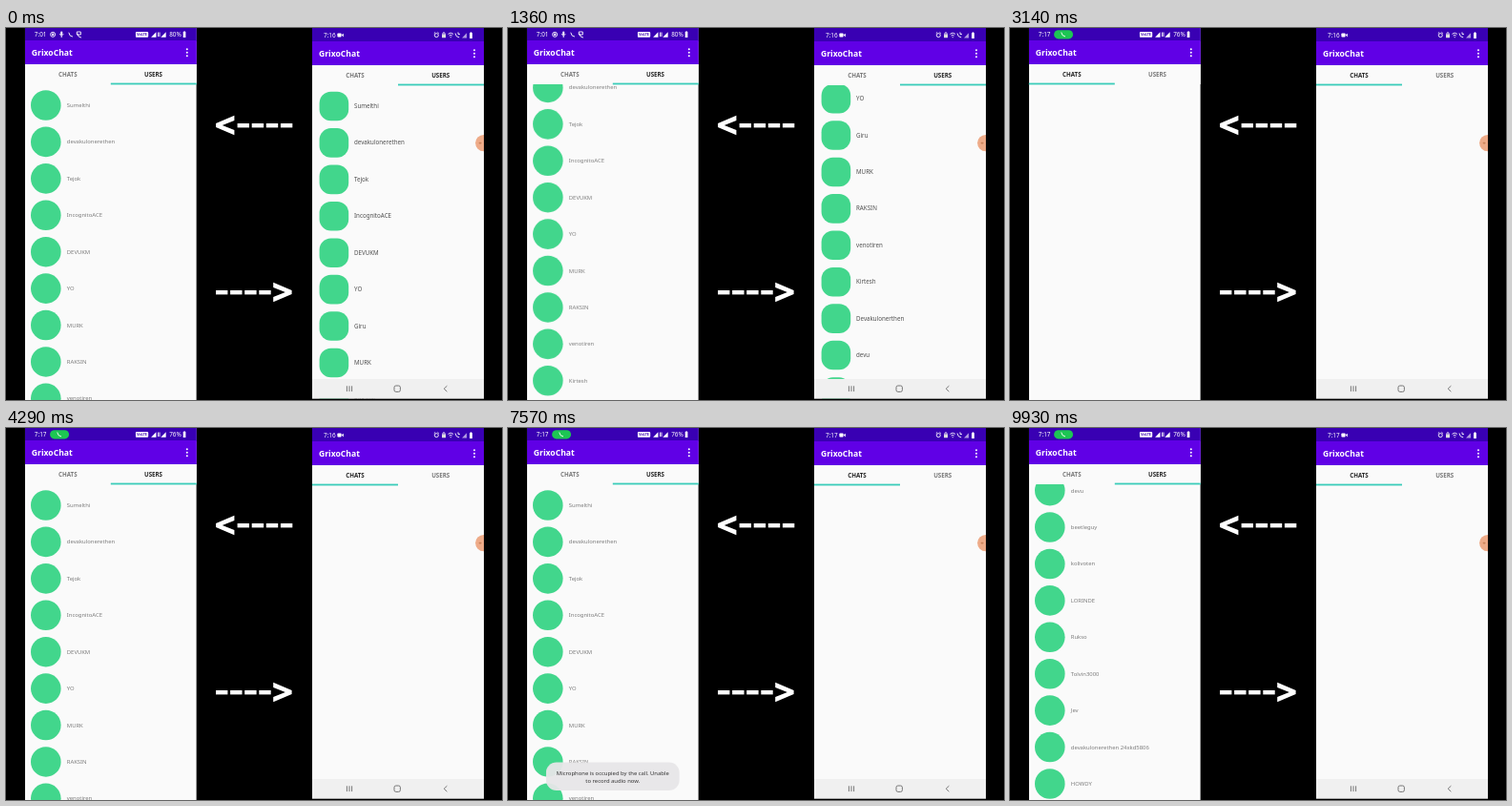
Animation, 520 px wide and 390 px high, one loop 10 s. Source, as an HTML page:

```html
<!DOCTYPE html>
<html lang="en">
<head>
<meta charset="utf-8">
<title>Two phones chatting</title>
<style>
html, body { margin: 0; width: 100%; height: 100%; overflow: hidden; background: #000; }
svg { display: block; width: 520px; height: 390px; }
text { font-family: "Noto Sans", sans-serif; }
.title { font-size: 8.6px; font-weight: 600; fill: #fff; }
.tab { font-size: 6.2px; font-weight: 600; text-anchor: middle; }
.status { font-size: 6.4px; fill: #fff; }
.badge { font-size: 3.6px; font-weight: 700; fill: #3700b3; text-anchor: middle; }
.toast text { font-size: 5.9px; fill: #333; text-anchor: middle; }
.left .name { font-size: 5.9px; fill: #7c7c7c; }
.right .name { font-size: 6.2px; fill: #505050; }
.icon { fill: none; stroke: #fff; stroke-width: .9; }
.key { fill: none; stroke: #777; stroke-width: 1; }

/* One loop is 10 s, so 1% is 100 ms. */
[class*="a-"] { animation: 10s linear infinite; }
.a-early { animation-name: early; animation-timing-function: step-end; }
.a-late { animation-name: late; animation-timing-function: step-end; }
.a-min16 { animation-name: min16; animation-timing-function: step-end; }
.a-min17 { animation-name: min17; animation-timing-function: step-end; }
.a-left-chats { animation-name: leftChats; animation-timing-function: step-end; }
.a-left-users { animation-name: leftUsers; animation-timing-function: step-end; }
.a-right-chats { animation-name: rightChats; animation-timing-function: step-end; }
.a-right-users { animation-name: rightUsers; animation-timing-function: step-end; }
.a-left-page { animation-name: leftPage; }
.a-left-line { animation-name: leftLine; }
.a-right-page { animation-name: rightPage; }
.a-right-line { animation-name: rightLine; }
.a-first-scroll { animation-name: firstScroll; }
.a-last-scroll { animation-name: lastScroll; }
.a-right-scroll { animation-name: rightScroll; }
.a-touch { animation-name: touch; }
.a-glow { animation-name: glow; }
.a-toast { animation-name: toast; }
.a-bubble { animation-name: bubble; }

@keyframes early { 0% { opacity: 1 } 30%, 100% { opacity: 0 } }
@keyframes late { 0% { opacity: 0 } 30%, 100% { opacity: 1 } }
@keyframes min16 { 0% { opacity: 1 } 74.3%, 100% { opacity: 0 } }
@keyframes min17 { 0% { opacity: 0 } 74.3%, 100% { opacity: 1 } }
@keyframes leftChats { 0% { fill: #777 } 30% { fill: #222 } 38.2%, 100% { fill: #777 } }
@keyframes leftUsers { 0% { fill: #222 } 30% { fill: #777 } 38.2%, 100% { fill: #222 } }
@keyframes rightChats { 0% { fill: #777 } 24.2%, 100% { fill: #222 } }
@keyframes rightUsers { 0% { fill: #222 } 24.2%, 100% { fill: #777 } }

@keyframes leftPage {
  0%, 36.8% { transform: translateX(180px); animation-timing-function: ease-out }
  40%, 100% { transform: none }
}
@keyframes leftLine {
  0%, 29.99% { transform: none }
  30%, 36.8% { transform: translateX(-90px); animation-timing-function: ease-out }
  40%, 100% { transform: none }
}
@keyframes rightPage {
  0%, 22.6% { transform: none; animation-timing-function: ease-out }
  26.6%, 100% { transform: translateX(181px) }
}
@keyframes rightLine {
  0%, 22.6% { transform: none; animation-timing-function: ease-out }
  26.6%, 100% { transform: translateX(-90px) }
}
@keyframes firstScroll {
  0%, .7% { transform: none }
  2.5% { transform: translateY(-120px); animation-timing-function: cubic-bezier(.2, .6, .4, 1) }
  7.4%, 9.5% { transform: translateY(-400px) }
  11.4% { transform: translateY(-300px); animation-timing-function: cubic-bezier(.2, .6, .4, 1) }
  16.5%, 100% { transform: none }
}
@keyframes lastScroll {
  0%, 87.6% { transform: none }
  90% { transform: translateY(-44.5px) }
  92% { transform: translateY(-150px); animation-timing-function: cubic-bezier(.2, .6, .4, 1) }
  98%, 100% { transform: translateY(-438px) }
}
@keyframes rightScroll {
  0%, 8.5% { transform: none }
  9.3% { transform: translateY(-4px) }
  10.6% { transform: translateY(-70px); animation-timing-function: ease-out }
  13.4%, 14.2% { transform: translateY(-200px); animation-timing-function: ease-in-out }
  16.8%, 100% { transform: none }
}
@keyframes touch {
  0%, .69% { opacity: 0; transform: translate(145px, 320px) }
  .7% { opacity: 1; transform: translate(145px, 320px) }
  2.5% { opacity: 1; transform: translate(145px, 200px) }
  2.6%, 8.6% { opacity: 0; transform: translate(145px, 200.5px) }
  8.7%, 9.5% { opacity: 1; transform: translate(145px, 200.5px) }
  11.4% { opacity: 1; transform: translate(145px, 300px) }
  11.5%, 87.3% { opacity: 0; transform: translate(149px, 344.5px) }
  87.4%, 87.6% { opacity: 1; transform: translate(149px, 344.5px) }
  90% { opacity: 1; transform: translate(149px, 300px) }
  92% { opacity: 1; transform: translate(149px, 194.5px) }
  92.1%, 100% { opacity: 0; transform: translate(149px, 194.5px) }
}
@keyframes glow {
  0%, 16.2% { transform: scaleY(0); opacity: 0 }
  18%, 18.8% { transform: scaleY(1); opacity: .15 }
  22%, 100% { transform: scaleY(0); opacity: 0 }
}
@keyframes toast {
  0%, 44.5% { opacity: 0 }
  46.4%, 79.4% { opacity: 1 }
  82%, 100% { opacity: 0 }
}
@keyframes bubble {
  0%, 47.2% { transform: none }
  48.6%, 57.2% { transform: translateX(-3px) }
  58.4%, 83.8% { transform: none }
  85.4%, 94% { transform: translateX(-3px) }
  96%, 100% { transform: none }
}
</style>
</head>
<body>
<svg id="stage" viewBox="0 0 520 390"></svg>
<script>
const PITCH = 38.42;
const APP = "GrixoChat";
const head = ["Sumelthi", "devakulonerethen", "Tejok", "IncognitoACE", "DEVUKM", "YO"];
const middle = ["MURK", "RAKSIN", "venotiren", "Kirtesh", "Devakulonerthen", "devu", "beetleguy",
  "kolivoten", "LORINDE", "Rukso", "Tolvin3000", "Jev"];
const firstList = [...head, ...middle, "HOWDY"];
const lastList = [...head, ...middle, "devakulonerethen 24xkd5806", "HOWDY"];
const rightList = [...head, "Giru", ...middle];

const group = (cls, body, at = "0 0") => `<g transform="translate(${at})"><g class="${cls}">${body}</g></g>`;
const rect = (x, y, w, h, fill, rx = 0) =>
  `<rect x="${x}" y="${y}" width="${w}" height="${h}" rx="${rx}" fill="${fill}"/>`;
const text = (cls, x, y, s) => `<text class="${cls}" x="${x}" y="${y}">${s}</text>`;
const icon = (d, cls = "icon") => `<path class="${cls}" d="${d}"/>`;
const solid = d => `<path fill="#fff" d="${d}"/>`;

const roundAvatar = y => `<circle cx="22" cy="${y}" r="15.8" fill="#42d68c"/>`;
const squareAvatar = y => rect(7.6, y - 15.3, 30.6, 30.6, "#42d68c", 12);
const rows = (names, avatar) => names.map((name, i) => {
  const y = +(81 + i * PITCH).toFixed(2);
  return avatar(y) + text("name", 44, y + 2, name);
}).join("");

const header = side =>
  rect(0, -1, 180, 15, "#3900b3") + rect(0, 13, 180, 25.2, "#6000e6") + rect(0, 38, 180, 21, "#fafafa") +
  text("title", 7, 29.2, APP) +
  [22.3, 25.8, 29.3].map(y => `<circle cx="170" cy="${y}" r="1" fill="#fff"/>`).join("") +
  text(`tab a-${side}-chats`, 45, 50.7, "CHATS") + text(`tab a-${side}-users`, 134.7, 50.7, "USERS") +
  group(`a-${side}-line`, rect(90, 57.6, 90, 1.8, "#3accb9"));

const handset = (x, y) => icon(`M${x - 2} ${y - 2.3}q.3 4 4.2 4.4`);
const battery = x => rect(x - 1.4, 4, 2.8, 6, "#fff", .5) + rect(x - .7, 3.3, 1.4, 1, "#fff");
const signal = x => solid(`M${x - 2.7} 9.8h5.4v-5.6z`);

const leftStatus =
  group("a-early", text("status", 10, 9.2, "7:01") + text("status", 151.4, 9.2, "80%") +
    `<circle class="icon" cx="29.3" cy="6.8" r="2.5"/><circle cx="29.3" cy="6.8" r="1.3" fill="#fff"/>` +
    rect(37.4, 3.6, 2, 3.8, "#fff", 1) + icon("M36.4 6.2q2 3.6 4 0M38.4 8v2") + handset(48, 7) +
    icon("M54.5 4h4v3h-4z") + handset(57, 8)) +
  group("a-late", text("status", 10, 9.2, "7:17") + text("status", 151.4, 9.2, "76%") +
    rect(26.3, 2.2, 20, 9.2, "#1dc653", 4.6) + handset(36, 6.8)) +
  rect(116, 4, 13.4, 5.8, "#fff", 1) + text("badge", 122.7, 8.3, "VoLTE") +
  signal(135) + signal(145.2) + icon("M139.8 4.5v4.6M141.2 4.5v4.6") + battery(167.3);

const rightStatus =
  group("a-min16", text("status", 12, 9, "7:16")) + group("a-min17", text("status", 12, 9, "7:17")) +
  rect(26.4, 4.5, 4.2, 4, "#fff", .8) + solid("M30.8 6.3l2-1.5v3.6z") +
  `<circle class="icon" cx="130.3" cy="6.6" r="2"/>` + icon("M127.8 4.6l1.3-1.2M132.8 4.6l-1.3-1.2") +
  rect(136, 5.5, 4, 3.8, "#ddd", .5) + icon("M136.9 5.8v-1.4q1.1-1.6 2.2 0v1.4") +
  icon("M142.5 5.3q2.7-2.3 5.4 0M143.7 7q1.5-1.3 3 0") + solid("M144.4 8.3h1.6l-.8 1.2z") +
  handset(152, 6.8) + icon("M153 3.4v2h2") +
  `<path fill="#fff" opacity=".6" d="M157 9.4h5v-5.2z"/>` + battery(166.5);

const screen = rect(0, -1, 180, 392, "#fafafa");

const leftPhone = screen +
  group("a-early", group("a-first-scroll", rows(firstList, roundAvatar))) +
  group("a-late", group("a-left-page", group("a-last-scroll", rows(lastList, roundAvatar)))) +
  header("left") + leftStatus +
  group("toast a-toast", rect(20, 350.6, 140, 29.4, "rgba(231,230,232,.95)", 11) +
    text("", 90, 364.2, "Microphone is occupied by the call. Unable") +
    text("", 90, 372, "to record audio now.")) +
  group("a-touch", `<circle r="5" fill="#fff" fill-opacity=".5" stroke="#bbb" stroke-width=".8"/>`);

const rightPhone = screen +
  group("a-right-page", group("a-right-scroll", rows(rightList, squareAvatar))) +
  group("a-glow", `<path fill="#6200ee" d="M0 0V5Q104 47 180 22V0z"/>`, "0 59") +
  header("right") + rightStatus +
  rect(0, 367, 180, 20.7, "#f0f0f0") + rect(0, 387.7, 180, 4, "#000") +
  icon("M36.4 374.3v5.8M39 374.3v5.8M41.6 374.3v5.8", "key") +
  `<rect class="key" x="86" y="374" width="6.4" height="6.4" rx="1.8"/>` +
  icon("M141.4 374.2l-3.2 3 3.2 3", "key") +
  group("a-bubble", `<circle cx="179.7" cy="119.6" r="8.6" fill="#eeab88"/>` + rect(174.6, 118.8, 3, 1.6, "#c98259", .8));

const dashes = (x, y) => [0, 1, 2, 3].map(i => rect(x + i * 15.1, y - 2, 12.4, 4.4, "#fff")).join("");
const arrows = dashes(242.6, 102) + dashes(220, 277) +
  solid("M239.4 91.8v5.2l-12.6 5 12.6 5v5.2l-19.4-8.2v-4zM280.2 266.8v5.2l12.6 5-12.6 5v5.2l19.4-8.2v-4z");

const phone = (side, at, body) =>
  `<g class="${side}" transform="translate(${at})" clip-path="url(#screen)">${body}</g>`;

document.getElementById("stage").innerHTML =
  `<clipPath id="screen">${rect(0, -1, 180, 392, "#000")}</clipPath>` +
  rect(0, 0, 520, 390, "#000") + arrows +
  phone("left", "19.8 0", leftPhone) + phone("right", "321 1", rightPhone);
</script>
</body>
</html>
```
